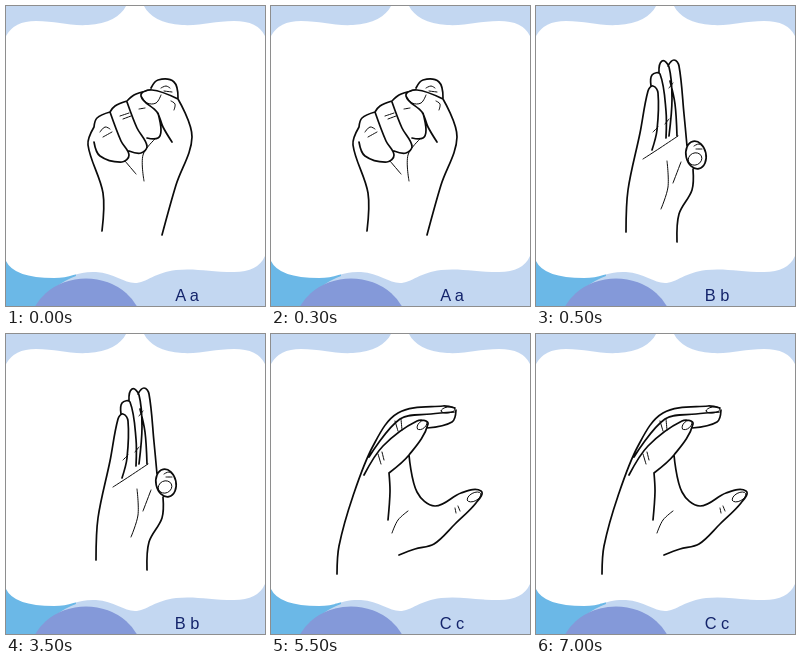
Recreate the animation shown at these times as an HTML page. Size 259 by 300 pixels, loop 8 s.

```html
<!DOCTYPE html>
<html lang="en">
<head>
<meta charset="utf-8">
<title>Hand alphabet</title>
<style>
html, body { margin: 0; width: 100%; height: 100%; overflow: hidden; background: #fff; }
svg { display: block; width: 100vw; height: 100vh; }
.hand { fill: none; stroke: #0b0b0b; stroke-width: 1.7; stroke-linecap: round; stroke-linejoin: round; }
.fine { stroke-width: 1; }
text { font: 16.4px "Liberation Sans", Arial, sans-serif; fill: #14246b; text-anchor: middle; }
</style>
</head>
<body>
<svg viewBox="0 0 259 300">
  <rect width="259" height="300" fill="#c3d7f1"/>
  <path fill="#6bb8e7" d="M0 240H70V270Q45 279 36 300H0Z"/>
  <ellipse cx="80" cy="323" rx="57" ry="50.5" fill="#8499d9"/>
  <path fill="#fff" d="M0 30Q8 15 30 15C50 15 62 20 82 19S115 10 120 0H138C143 10 156 18 176 19S208 15 228 15Q252 15 259 30V250Q252 266 228 266C204 266 190 262 170 264S140 277 129 277S108 267 90 266S65 272 48 272Q8 272 0 255Z"/>
  <g class="hand"><path id="bold"/><path id="fine" class="fine"/></g>
  <text id="label" x="181" y="294.5"></text>
</svg>
<script>
// Smooth stroke through points: tangents follow the neighbours.
function stroke(text) {
  const pts = text.trim().split(/\s+/).map(p => p.split(",").map(Number));
  const handle = (i, reach) => {
    const [x, y] = pts[i], a = pts[i - 1], b = pts[i + 1];
    if (!a || !b) return [x, y];
    const dx = b[0] - a[0], dy = b[1] - a[1], k = reach / Math.hypot(dx, dy);
    return [x + dx * k, y + dy * k];
  };
  let d = "M" + pts[0];
  for (let i = 1; i < pts.length; i++) {
    const [p, q] = [pts[i - 1], pts[i]];
    const third = Math.hypot(q[0] - p[0], q[1] - p[1]) / 3;
    d += `C${handle(i - 1, third)} ${handle(i, -third)} ${q}`;
  }
  return d;
}

const strokes = text => text.split("/").map(stroke).join("");

function oval(x, y, rx, ry, turn = 0) {
  const a = turn * Math.PI / 180, dx = rx * Math.cos(a), dy = rx * Math.sin(a);
  const half = `A${rx} ${ry} ${turn} 0 1 `;
  return `M${x - dx} ${y - dy}${half}${x + dx} ${y + dy}${half}${x - dx} ${y - dy}`;
}

const fist = {
  label: "A a",
  bold: strokes(`96,225 97,187 82,139 88,121 / 88,121 91,112 104,106 / 104,106 109,100 121,95
    / 121,95 128,89 140,85 / 88,136 94,150 116,156 123,149 115,135 104,106
    / 123,145 135,147 141,140 131,122 121,96 / 141,132 152,132 155,124 152,107
    / 145,82 152,74 168,76 172,92 / 172,93 146,84 135,90 151,106 157,121 166,136
    / 172,93 186,131 170,179 156,229`),
  fine: strokes(`94,126 99,121 104,123 / 97,131 106,126 / 114,110 123,107 / 117,113 125,110
    / 133,103 139,102 / 155,82 160,80 164,82 / 158,85 166,86 / 165,95 169,98 168,104
    / 149,133 137,149 138,175 / 119,155 130,168 / 136,91 141,97 150,97 155,89`)
};

const flat = {
  label: "B b",
  bold: strokes(`90,226 92,184 104,127 112,85 117,80 122,87 121,124 116,144
    / 115,80 116,69 124,68 130,105 130,132 / 123,67 126,55 133,61 136,93 133,130
    / 132,60 138,54 143,60 148,108 151,140 / 134,75 139,98 141,130
    / 157,163 156,184 143,208 141,236`) + oval(160, 149, 14, 10, 78),
  fine: strokes(`107,153 124,142 142,130 / 131,155 132,181 125,203 / 145,156 137,177
    / 117,126 122,121 / 129,118 133,113 / 133,82 137,77 / 158,140 163,138 167,141
    / 160,143 166,143`) + oval(159, 153, 7, 6, -25)
};

const curved = {
  label: "C c",
  bold: strokes(`66,240 68,212 82,162 102,112 127,79 172,72 184,74 / 183,78 160,80 129,85 98,123
    / 185,76 181,88 156,94 / 93,141 112,112 146,87 157,90 138,121 118,139
    / 118,139 119,158 117,186
    / 138,121 146,158 164,172 190,159 210,157 205,169 184,190 163,210 144,215 128,221`),
  fine: strokes(`124,87 127,97 / 130,85 131,96 / 107,120 110,130 / 111,118 113,126
    / 184,174 185,179 / 187,172 189,177 / 137,177 127,186 121,199`)
    + oval(177, 76, 7, 3, -8) + oval(151, 91, 6, 3.5, -42) + oval(203, 163, 7.5, 4, -28)
};

const signAt = time => time < 500 ? fist : time < 5500 ? flat : curved;
const byId = id => document.getElementById(id);
const start = performance.now();
let shown;

function draw(now) {
  const sign = signAt(Math.max(0, now - start) % 8000);
  if (sign !== shown) {
    byId("bold").setAttribute("d", sign.bold);
    byId("fine").setAttribute("d", sign.fine);
    byId("label").textContent = sign.label;
    shown = sign;
  }
  requestAnimationFrame(draw);
}
draw(start);
</script>
</body>
</html>
```
